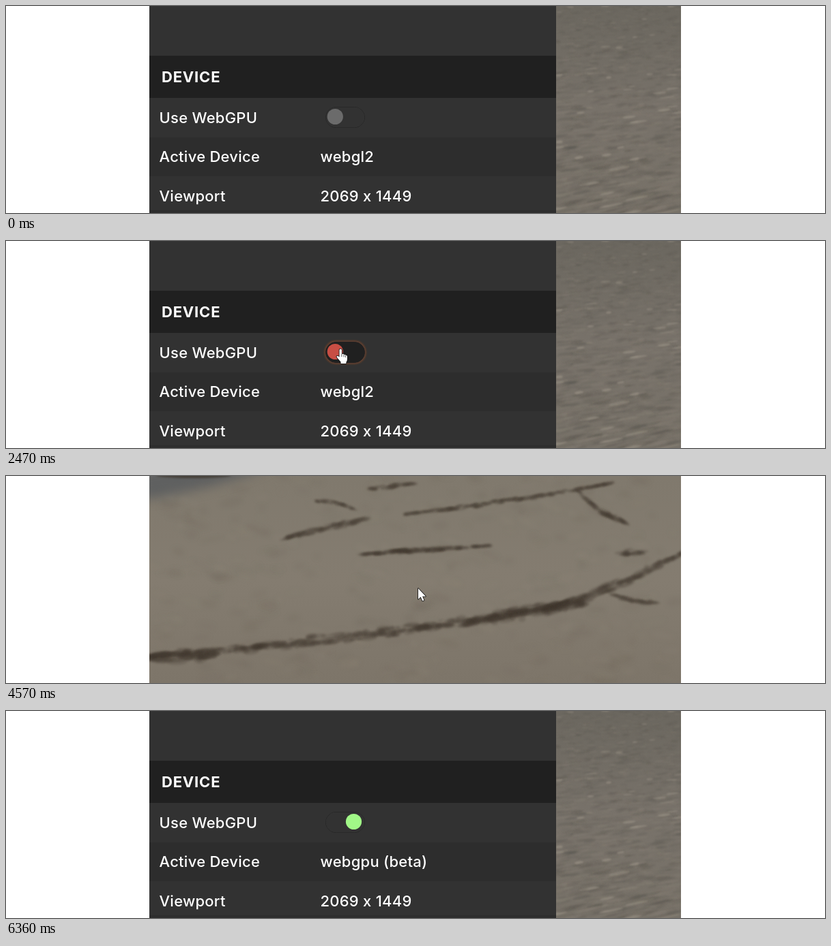
Animation of 1200x304 px, one loop 7.68 s. Source, as an HTML page with a canvas:

```html
<!DOCTYPE html>
<html lang="en">
<head>
<meta charset="utf-8">
<title>Device switch</title>
<style>
  html, body { margin: 0; width: 100%; height: 100%; overflow: hidden; background: #fff; }
  canvas { display: block; }
</style>
</head>
<body>
<canvas id="stage" width="1200" height="304"></canvas>
<script>
const ctx = document.getElementById('stage').getContext('2d');
const LOOP = 7680, LEFT = 210, SPLIT = 806, RIGHT = 989, H = 304;
const HOVER = 1260, CLICK = 2470, RELOAD = 4570, PANEL_BACK = 4680, RESIZED = 5200;

const arrow = new Path2D('M0 0V16L3.6 12.6 6.2 18.4 8.6 17.4 6.1 11.7H11Z');
const hand = new Path2D('M4.5 12.5V2.2a1.7 1.7 0 0 1 3.4 0V8q2.5-1 3.2.8 2-.6 2.6 1 2.2-.4 2.3 1.6v4q0 2.5-1.6 4.5V22H6.5v-2.5Q4 17 .6 12.6q-.6-1.8 1-1.8 1.4 0 2.9 1.7Z');

const clamp01 = v => Math.max(0, Math.min(1, v));
const mix = (a, b, k) => a + (b - a) * k;
const smooth = k => k * k * (3 - 2 * k);
const easeOut = k => 1 - (1 - k) ** 2.2;

// The cursor rests between moves; bend bows a move up or down
const cursorStart = { x: 524, y: 300 };
const moves = [
  { from: 770, to: 1520, x: 490, y: 166, ease: easeOut },
  { from: 1540, to: 1760, x: 479, y: 153 },
  { from: 2070, to: 2300, x: 490, y: 158, bend: -5 },
  { from: 3050, to: 3580, x: 604, y: 165, bend: 12 },
  { from: 5850, to: 6360, x: 638, y: 304 }
];

function randomizer(seed) {
  return () => (seed = (seed * 16807) % 2147483647) / 2147483647;
}

function makeLayer(width, paint) {
  const layer = document.createElement('canvas');
  layer.width = width;
  layer.height = H;
  paint(layer.getContext('2d'), width);
  return layer;
}

function fillGradient(c, width, ...stops) {
  const g = c.createLinearGradient(0, 0, 0, H);
  stops.forEach((color, i) => g.addColorStop(i / (stops.length - 1), color));
  c.fillStyle = g;
  c.fillRect(0, 0, width, H);
}

function ellipse(c, color, x, y, rx, ry, angle = 0) {
  c.fillStyle = color;
  c.beginPath();
  c.ellipse(x, y, rx, ry, angle, 0, 7);
  c.fill();
}

// Streaks grow and tilt towards the viewer
const gravel = makeLayer(RIGHT - SPLIT, (c, width) => {
  const random = randomizer(41);
  fillGradient(c, width, '#6b675f', '#78726a', '#777168');
  c.filter = 'blur(0.9px)';
  for (let i = 0; i < 1300; i++) {
    const depth = random(), pebble = i % 30 === 0;
    const tone = pebble ? '168,160,147' : i % 2 ? '146,138,126' : '76,74,68';
    const alpha = pebble ? .45 : .06 + random() * .16;
    ellipse(c, `rgba(${tone},${alpha})`, random() * width, depth * H,
      (3 + random() * 6) * (.7 + depth * 1.5), .6 + random() * (.5 + depth * 1.5), -.02 - depth * .18);
  }
});

const ground = makeLayer(RIGHT - LEFT, (c, width) => {
  const random = randomizer(7);
  const dark = alpha => `rgba(68,60,50,${alpha})`;

  // A sagging line of overlapping soft flecks, thin at both ends
  function crack(x0, y0, x1, y1, sag, size) {
    const count = Math.hypot(x1 - x0, y1 - y0) * .8;
    for (let i = 0; i < count; i++) {
      const k = random(), bow = Math.sin(Math.PI * k);
      const spread = size * (.3 + .7 * bow) * (random() + random() - 1);
      ellipse(c, dark(.22), mix(x0, x1, k), mix(y0, y1, k) + sag * bow + spread,
        3 + size * random(), 1 + size * .3 * random(), Math.atan2(y1 - y0, x1 - x0));
    }
  }

  fillGradient(c, width, '#80796d', '#847c70', '#7d7569');
  c.translate(-LEFT, 0);
  c.filter = 'blur(3px)';
  for (let i = 0; i < 350; i++) {
    const tone = i % 2 ? '148,140,127' : '100,92,81';
    ellipse(c, `rgba(${tone},${.04 + random() * .1})`, LEFT + random() * width, random() * H,
      4 + random() * 14, 2 + random() * 5, random() * .8 - .3);
  }
  c.filter = 'blur(8px)';
  ellipse(c, 'rgba(84,88,93,.75)', 250, 4, 150, 22, -.2);
  c.filter = 'blur(1.5px)';
  ellipse(c, '#443e36', 275, -1, 55, 4);

  crack(200, 266, 800, 193, 7, 9);
  crack(790, 194, 1000, 108, 8, 9);
  crack(670, 217, 850, 186, -1, 12);
  crack(190, 268, 310, 262, 0, 13);
  crack(410, 91, 528, 63, 0, 7);
  crack(565, 110, 640, 108, 0, 5);
  crack(520, 115, 710, 102, 0, 4);
  crack(585, 56, 890, 10, 3, 4);
  crack(838, 22, 908, 69, 6, 6);
  crack(455, 37, 512, 50, -4, 3);
  crack(532, 19, 600, 11, 0, 4);
  crack(890, 175, 955, 186, 3, 5);
  crack(900, 114, 932, 112, 0, 7);
});

function label(text, x, y, weight = 500, spacing = .25) {
  ctx.font = `${weight} 22px Inter, sans-serif`;
  ctx.letterSpacing = spacing + 'px';
  ctx.fillStyle = '#fff';
  ctx.fillText(text, x, y);
}

function outlinePill(grow, width, color) {
  ctx.beginPath();
  ctx.roundRect(468.5 - grow, 148.5 - grow, 57 + 2 * grow, 30 + 2 * grow, 15 + grow);
  ctx.lineWidth = width;
  ctx.strokeStyle = color;
  ctx.stroke();
}

function drawToggle(t) {
  const active = t >= HOVER && t < RELOAD;
  const on = smooth(clamp01((t - CLICK) / 140));
  if (active) {
    outlinePill(2, 3, 'rgba(255,102,0,.09)');
    outlinePill(1, 2, '#5a3d30');
  }
  outlinePill(0, 1, '#202020');
  ctx.fillStyle = active ? '#202020' : '#323232';
  ctx.fill();
  const off = active ? [200, 78, 68] : [107, 107, 107], green = [161, 248, 135];
  const color = off.map((v, i) => Math.round(mix(v, green[i], on)));
  ellipse(ctx, `rgb(${color})`, mix(482.3, 509.5, on), 162.5, 11.6, 11.6);
}

function drawRow(y, height, color) {
  ctx.fillStyle = color;
  ctx.fillRect(LEFT, y, SPLIT - LEFT, height);
}

function drawPanel(t) {
  drawRow(0, H, '#323232');
  drawRow(73, 62, '#202020');
  drawRow(193, 57, '#2d2d2d');
  drawRow(300, 4, '#2d2d2d');
  label('DEVICE', 228, 112, 700, .8);
  label('Use WebGPU', 224.5, 172);
  label('Active Device', 224.5, 229);
  label('Viewport', 224.5, 287);
  label(t < RELOAD ? 'webgl2' : 'webgpu (beta)', 460.5, 229);
  label(t >= RELOAD && t < RESIZED ? '2666 x 1449' : '2069 x 1449', 460.5, 287);
  drawToggle(t);
}

function cursorAt(t) {
  let { x, y } = cursorStart;
  for (const { from, to, x: endX, y: endY, bend = 0, ease = smooth } of moves) {
    const k = ease(clamp01((t - from) / (to - from)));
    x = mix(x, endX, k);
    y = mix(y, endY, k) + bend * Math.sin(Math.PI * k);
  }
  return { x: Math.round(x), y: Math.round(y) };
}

function drawCursor(t) {
  if (t < moves[0].from || t >= moves.at(-1).to) return;
  const { x, y } = cursorAt(t);
  const isHand = x > 467 && x < 527 && y > 147 && y < 180;
  const shape = isHand ? hand : arrow;
  ctx.save();
  ctx.translate(isHand ? x - 6 : x, y);
  ctx.lineJoin = 'round';
  ctx.lineWidth = 1.6;
  ctx.strokeStyle = '#111';
  ctx.stroke(shape);
  ctx.fillStyle = '#fff';
  ctx.fill(shape);
  if (isHand) {
    ctx.lineWidth = .7;
    ctx.stroke(new Path2D('M7.9 8v4M11.1 9v3.4M13.7 10v3'));
  }
  ctx.restore();
}

function draw(t) {
  ctx.fillStyle = '#fff';
  ctx.fillRect(0, 0, 1200, H);
  if (t >= RELOAD && t < PANEL_BACK) {
    ctx.drawImage(ground, LEFT, 0);
  } else {
    // Until the viewport resizes, the wide picture is squeezed into the narrow view
    if (t >= PANEL_BACK && t < RESIZED) {
      ctx.drawImage(ground, 0, 0, 236, H, SPLIT, 0, RIGHT - SPLIT, H);
    } else {
      ctx.drawImage(gravel, SPLIT, 0);
    }
    drawPanel(t);
  }
  drawCursor(t);
}

const start = performance.now();
function frame() {
  draw((performance.now() - start) % LOOP);
  requestAnimationFrame(frame);
}
frame();
</script>
</body>
</html>
```
